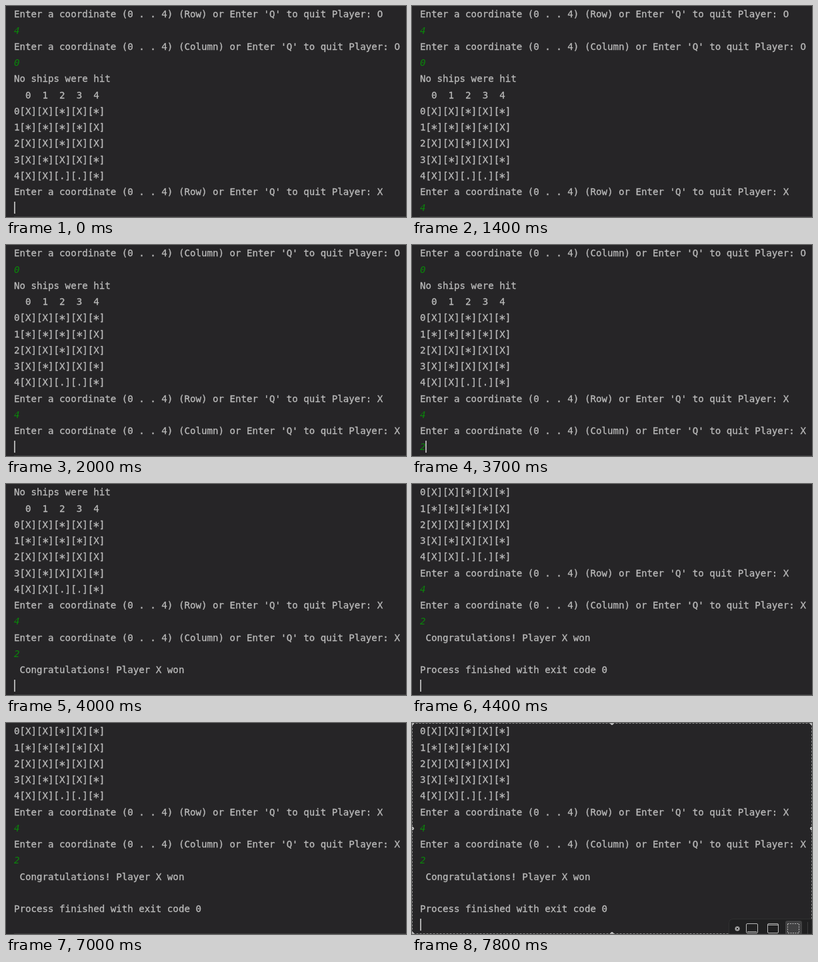
Write an HTML page that moves like this. It is 600 px wide and 317 px high and loops after 8 s.

```html
<!DOCTYPE html>
<html lang="en">
<head>
<meta charset="utf-8">
<title>Console game</title>
<style>
  html, body { margin: 0; width: 100%; height: 100%; overflow: hidden; background: #262527; }
  #stage { position: relative; width: 600px; height: 317px; overflow: hidden; background: #262527; }
  #log {
    position: absolute; left: 12px; margin: 0; color: #bababa;
    font: 14.15px/24.27px "DejaVu Sans Mono", "Noto Sans Mono", monospace;
    -webkit-text-stroke: 0.3px;
  }
  #log div { height: 24.27px; white-space: pre; }
  #log .input { color: #0a860a; font-style: italic; -webkit-text-stroke: 0; }
  #log i { display: inline-block; height: 24.27px; vertical-align: top; font-style: normal;
    transform: translateY(2.5px) scale(1.2); transform-origin: 50% 38%; }
  #edge { position: absolute; left: 12px; top: 316px; width: 588px; height: 1px; background: #3b3b3c; }
  #caret { position: absolute; top: 294px; width: 2px; height: 18px; background: #adadad; }
  #capture { position: absolute; left: 0; top: 0; }
</style>
</head>
<body>
<div id="stage">
  <div id="log"></div>
  <div id="edge"></div>
  <div id="caret"></div>
  <svg id="capture" width="600" height="317" fill="none">
    <rect x=".5" y=".5" width="599" height="316" stroke="#222"/>
    <rect x=".5" y=".5" width="599" height="316" stroke="#8c8c8c" stroke-dasharray="3 2"/>
    <g id="handles" fill="#a8a8a8" stroke="#d8d8d8"></g>
    <path d="M475.5 317V301q0-6.500 6.500-6.500H600V317Z" fill="#202021" stroke="#303031"/>
    <path d="M593.500 299v18" stroke="#3c3c3d"/>
    <rect x="560" y="297" width="25" height="22" rx="3" fill="#414142"/>
    <g stroke="#b8b8b8">
      <circle cx="488" cy="309" r="3.500" fill="#aaa" stroke="none"/>
      <path d="M486.500 307.500l3 3m0-3l-3 3" stroke="#222"/>
      <rect x="501.500" y="301.500" width="17" height="14" rx="1.500"/>
      <path d="M503 313.500h14"/>
      <rect x="533.500" y="301.500" width="16" height="14" rx="1.500"/>
      <path d="M534 303.500h15"/>
      <rect x="563.500" y="301.500" width="17" height="14" stroke-dasharray="2 1.500"/>
    </g>
  </svg>
</div>
<script>
const LOOP = 8000, LINE = 24.27, LEFT = 12, CHAR = 8.52;
const $ = id => document.getElementById(id);
const ask = (axis, player) =>
  ({ text: `Enter a coordinate (0 . . 4) (${axis}) or Enter 'Q' to quit Player: ${player}` });
const typed = (text, at = 0) => ({ text, at, input: true });
const board = ["XX*X*", "****X", "XX*XX", "X*XX*", "XX..*"]
  .map((row, i) => ({ text: i + [...row].map(c => `[${c}]`).join("") }));

const lines = [
  ask("Row", "O"), typed("4"),
  ask("Column", "O"), typed("0"),
  { text: "No ships were hit" },
  { text: "  0  1  2  3  4" },
  ...board,
  ask("Row", "X"), typed("4", 900),
  { ...ask("Column", "X"), at: 1900 }, typed("2", 3700),
  { text: " Congratulations! Player X won", at: 4000 },
  { text: "" },
  { text: "Process finished with exit code 0", at: 4400 }
];
const scrolls = [1800, 1900, 3900, 4000, 4400, 4400];
const blinks = [400, 900, 1400, 1800, 2900, 3400, 5000, 5500, 6000, 6500, 7000, 7500];

for (const line of lines) {
  line.el = document.createElement("div");
  line.el.innerHTML = line.text.replace(/\*/g, "<i>*</i>");
  if (line.input) line.el.className = "input";
  $("log").append(line.el);
}

// Eight grips around the selection; the centre is skipped.
for (const x of [0.5, 300, 599.5])
  for (const y of [0.5, 158.5, 316.5])
    if (x !== 300 || y !== 158.5)
      $("handles").innerHTML += `<circle cx="${x}" cy="${y}" r="2"/>`;

const passed = (times, t) => times.filter(at => t >= at).length;
const within = (t, from, to) => t >= from && t < to;
const show = (el, on) => { el.style.visibility = on ? "visible" : "hidden"; };

function draw(t) {
  $("log").style.top = 0.3 - passed(scrolls, t) * LINE + "px";
  for (const { el, at = 0 } of lines) show(el, t >= at);
  const afterDigit = within(t, 900, 1800) || within(t, 3700, 3900);
  $("caret").style.left = Math.round(LEFT + (afterDigit ? CHAR - 0.6 : 0)) + "px";
  show($("caret"), passed(blinks, t) % 2 === 0);
  $("capture").style.opacity = passed([7700, 7800], t) / 2;
}

const start = performance.now();
function tick() {
  draw((performance.now() - start) % LOOP);
  requestAnimationFrame(tick);
}
tick();
</script>
</body>
</html>
```
